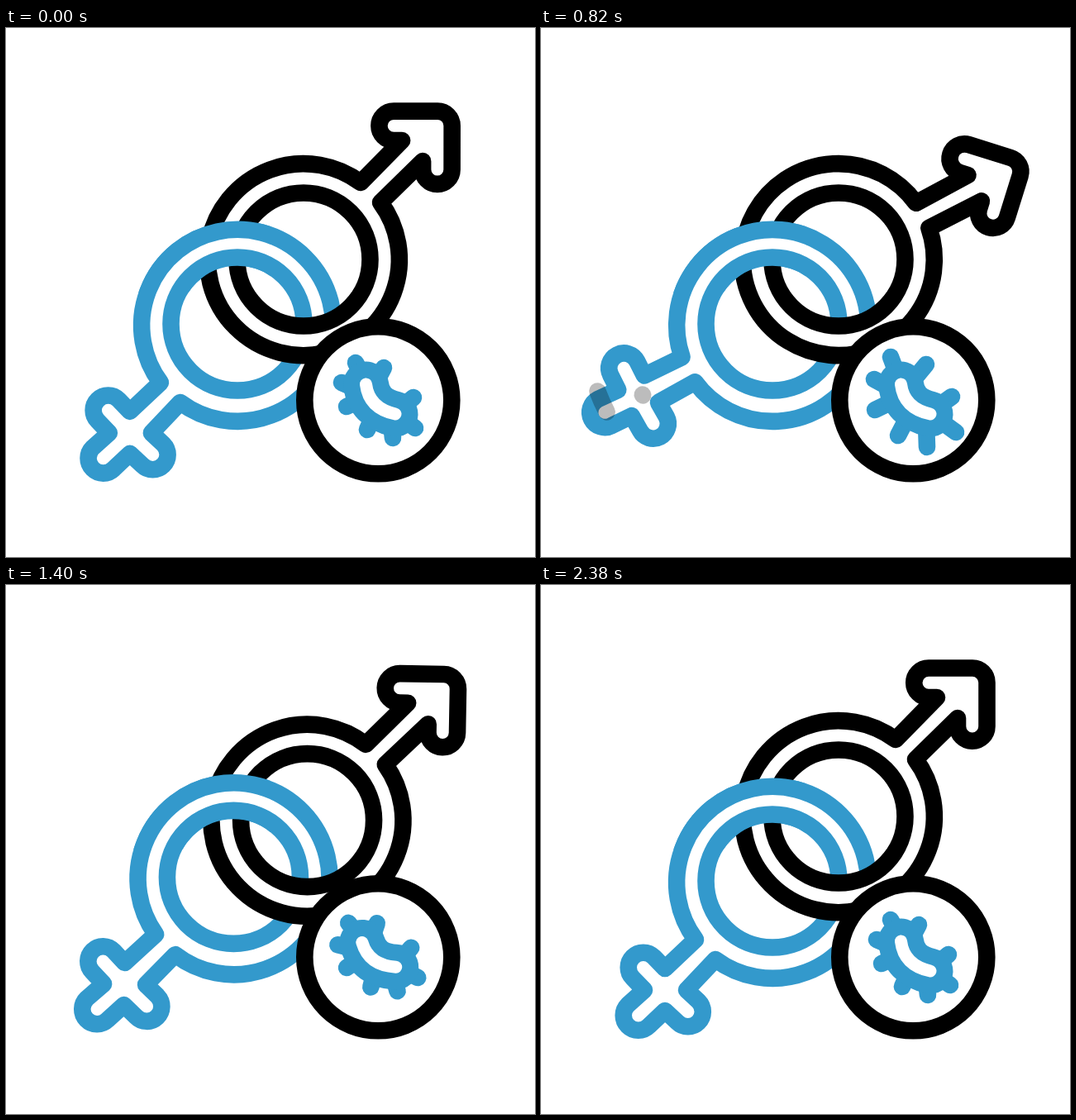
Recreate the animation shown at these times as an HTML page with a canvas. Size 640 by 640 pixels, loop 2400 ms.

```html
<!DOCTYPE html>
<html>
<head>
<meta charset="utf-8">
<style>
html, body { margin: 0; height: 100%; overflow: hidden; background: #fff; }
canvas { display: block; width: 100vmin; height: 100vmin; }
</style>
</head>
<body>
<canvas id="stage" width="640" height="640"></canvas>
<script>
const ctx = document.getElementById('stage').getContext('2d');
const LOOP = 2400, BLUE = '#39c', BLACK = '#000', LINE = 20.6;
const MALE = [360, 280], FEMALE = [280, 360];
const rad = deg => deg * Math.PI / 180;
const clamp = x => Math.min(1, Math.max(0, x));
const mix = (a, b, x) => a + (b - a) * x;
const smooth = x => (1 - Math.cos(Math.PI * clamp(x))) / 2;
const sineOut = x => Math.sin(x * Math.PI / 2);
const powerOut = x => 1 - (1 - x) ** 2.33;

// Keys are [time, value, easing into this key]
function track(keys, t) {
  const i = keys.findIndex(k => k[0] > t);
  if (i < 0) return keys[keys.length - 1][1];
  if (i === 0) return keys[0][1];
  const [t0, v0] = keys[i - 1], [t1, v1, ease = smooth] = keys[i];
  return mix(v0, v1, ease((t - t0) / (t1 - t0)));
}

const SWING = [[0, 0], [767, 19, powerOut], [1100, -7], [1705, 9.2], [2180, 0]];
const SHIFT = [[0, 0], [1080, 0], [1700, 6.3, sineOut], [2180, 0]];
const WOBBLE = [[0, 0], [410, -9.7], [810, 0], [1080, 0], [1460, -10], [1900, 0]];
const STRETCH = [[0, 0], [400, 0], [820, 1], [1250, 0], [1400, 0], [1750, 1], [2180, 0]];

// Outlines relative to the ring centre, closed by the ring itself
const RING = 'A116 116 0 1 ';
const malePath = new Path2D(
  'M69 -93L119 -144H109A17.7 17.7 0 0 1 109 -179.5H162A17.5 17.5 0 0 1 179.5 -162V-109' +
  'A17.7 17.7 0 0 1 144 -109V-119L93 -69' + RING + '1 69 -93Z');
const femalePath = new Path2D(
  'M-93 69L-130 104L-143.5 90A18 18 0 0 0 -169 115.5L-155 130L-175 148' +
  'A18 18 0 0 0 -149.5 173.5L-130 155L-115 169A18 18 0 0 0 -89.5 143.5L-104 130L-69 93' +
  RING + '0 -93 69Z');

const slug = new Path2D('M435.5 431Q439 460 471 467');
// Root, tip at rest and tip at full stretch of each bristle
const BRISTLES = [
  [432, 422, 423, 405, 423, 398], [447, 430, 457, 411, 466, 407],
  [427, 438, 406, 429, 403, 425], [431, 449, 412, 458, 404, 462],
  [444, 470, 437, 486, 432, 493], [466, 478, 468, 496, 467, 507],
  [480, 473, 495, 484, 502, 489], [476, 461, 493, 447, 497, 446]
];
// Centre, colour, radius, from angle, to angle, head start, tail start
const STREAKS = [
  [FEMALE, BLACK, 226, 159.4, 117, 768, 902],
  [FEMALE, BLACK, 178, 152, 102, 814, 932],
  [MALE, BLUE, 151, -28, -76, 880, 1000],
  [MALE, BLUE, 199, -20, -60, 825, 920]
];

function pen(color, width = LINE) {
  ctx.strokeStyle = color;
  ctx.lineWidth = width;
}

function symbol([x, y], path, color, angle, holeY) {
  ctx.save();
  ctx.translate(x, y);
  const outline = new Path2D(), hole = new Path2D();
  outline.addPath(path, new DOMMatrix().rotate(angle));
  hole.arc(0, holeY, 80.5, 0, 2 * Math.PI);
  outline.addPath(hole);
  ctx.fillStyle = '#fff';
  ctx.fill(outline, 'evenodd');
  pen(color);
  ctx.stroke(outline);
  ctx.restore();
}

function streak([[x, y], color, r, from, to, headStart, tailStart], t) {
  if (t < headStart || t > tailStart + 200) return;
  const at = start => rad(mix(from, to, smooth((t - start) / 200)));
  const tail = at(tailStart);
  ctx.beginPath();
  ctx.arc(x, y, r, tail, Math.min(at(headStart), tail - 0.005), true);
  ctx.globalAlpha = clamp((t - 800) / 80);
  pen(color);
  ctx.stroke();
  ctx.globalAlpha = 1;
}

function badge(t) {
  ctx.beginPath();
  ctx.arc(450.3, 450.3, 89, 0, 2 * Math.PI);
  ctx.fillStyle = '#fff';
  ctx.fill();
  pen(BLACK);
  ctx.stroke();

  ctx.save();
  ctx.translate(442, 460);
  ctx.rotate(rad(track(WOBBLE, t)));
  ctx.translate(-442, -460);
  const stretch = track(STRETCH, t);
  ctx.beginPath();
  for (const [x, y, restX, restY, fullX, fullY] of BRISTLES) {
    ctx.moveTo(x, y);
    ctx.lineTo(mix(restX, fullX, stretch), mix(restY, fullY, stretch));
  }
  pen(BLUE);
  ctx.stroke();
  pen(BLUE, 55);
  ctx.stroke(slug);
  pen('#fff', 15);
  ctx.stroke(slug);
  ctx.restore();
}

function draw(t) {
  const angle = track(SWING, t), d = track(SHIFT, t);
  const female = () => symbol([FEMALE[0] - d, FEMALE[1] - d], femalePath, BLUE, angle, -2);
  ctx.clearRect(0, 0, 640, 640);
  ctx.lineCap = ctx.lineJoin = 'round';
  female();
  symbol([MALE[0] + d, MALE[1] + d], malePath, BLACK, angle, 0);
  // The rings interlock: blue passes over at the upper left crossing
  ctx.save();
  ctx.beginPath();
  ctx.rect(0, 0, 320, 320);
  ctx.clip();
  female();
  ctx.restore();
  for (const s of STREAKS) streak(s, t);
  badge(t);
}

function frame() {
  draw(performance.now() % LOOP);
  requestAnimationFrame(frame);
}
frame();
</script>
</body>
</html>
```
